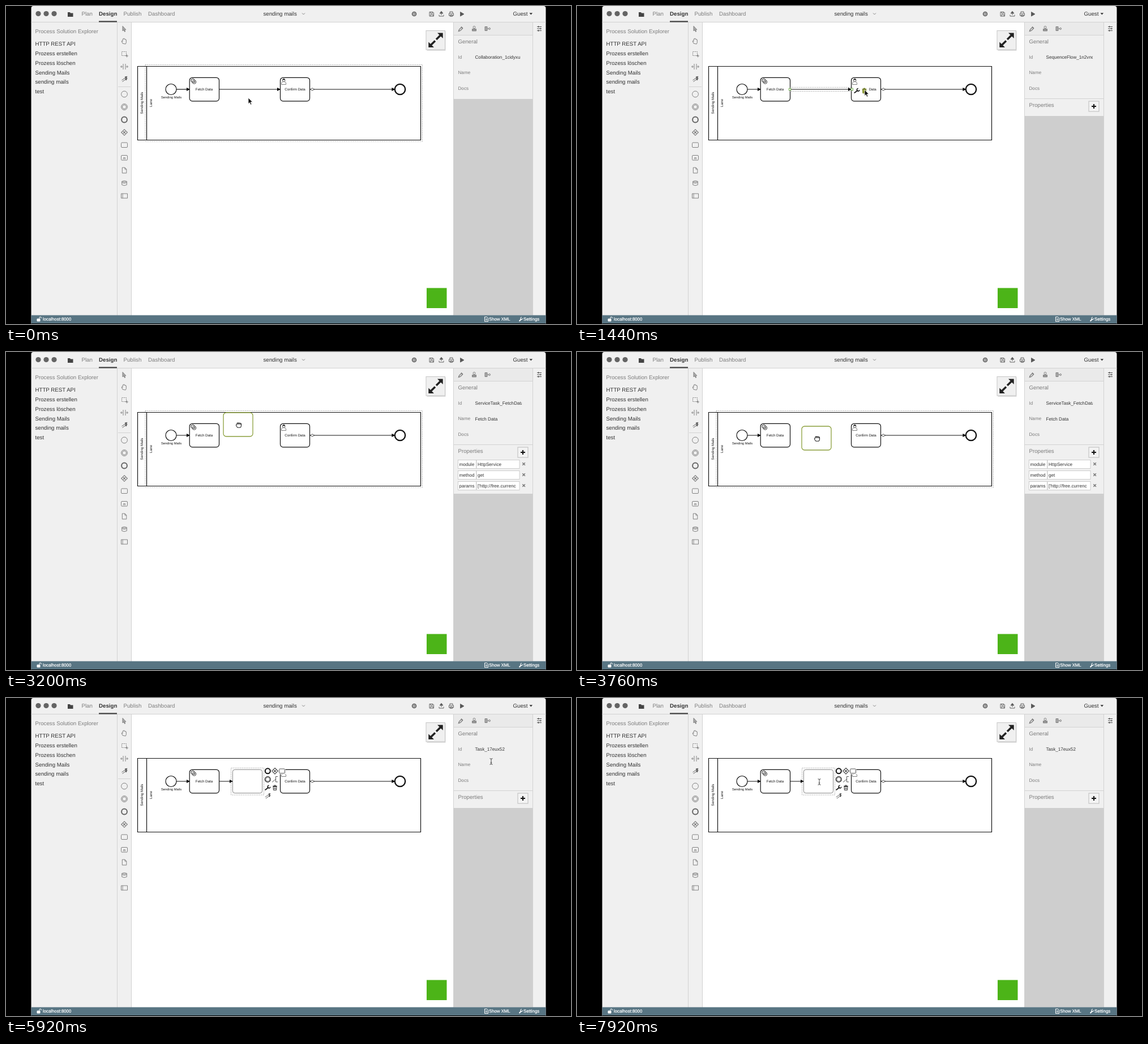
An HTML page that plays this animation: 998 px wide and 561 px high, repeating every 8 s.

```html
<!DOCTYPE html>
<html lang="en">
<head>
<meta charset="utf-8">
<title>Process designer</title>
<style>
html, body { margin: 0; width: 100%; height: 100%; overflow: hidden; background: #000; }
svg { display: block; width: 100%; height: 100%; }
text { font-family: "Liberation Sans", Arial, sans-serif; font-size: 9.7px; fill: #333; white-space: pre; text-rendering: geometricPrecision; }
.mute { fill: #7c7c7c; }
.small { font-size: 8.15px; }
.task { font-size: 6.2px; fill: #111; text-anchor: middle; }
.foot { font-size: 7.8px; fill: #fff; stroke: #fff; stroke-width: .2; }
.line { fill: none; stroke: #111; stroke-width: 1.2; }
.thin { fill: none; stroke: #777; stroke-width: .9; }
.dash { fill: none; stroke: #999; stroke-width: .8; stroke-dasharray: 1.8 1.4; }
.box { fill: #fff; stroke: #111; stroke-width: 1.2; }
.rule { fill: none; stroke: #d2d2d2; stroke-width: 1; }
.field { fill: #fff; stroke: #c4c4c4; stroke-width: .8; }
</style>
</head>
<body>
<svg viewBox="0 0 998 561" preserveAspectRatio="none">
  <defs>
    <clipPath id="win"><path d="M44.5 561V4q0-4 4-4H949.5q4 0 4 4V561z"/></clipPath>
    <clipPath id="idClip"><rect x="828" y="80" width="83" height="18"/></clipPath>
    <clipPath id="keyClip"><rect x="799" y="188" width="30.5" height="60"/></clipPath>
    <clipPath id="valClip"><rect x="831" y="188" width="75" height="60"/></clipPath>
    <marker id="tip" viewBox="0 0 6 6" refX="5.6" refY="3" markerWidth="6" markerHeight="6" markerUnits="userSpaceOnUse"><path d="M0 0L6 3L0 6z"/></marker>
    <g id="wrench"><path d="M-4.2 3.6L1.2-.5" stroke="#222" stroke-width="1.9" stroke-linecap="round"/><path d="M4.5-1.6A2.4 2.4 0 1 1 2.3-4" fill="none" stroke="#222" stroke-width="1.5"/></g>
    <path id="trash" d="M-3-1.8L-2.6 4.2H2.6L3-1.8zM-4-2.8H4M-1.4-3V-4.3H1.4V-3M-1-.3V2.8M1-.3V2.8"/>
    <g id="connect"><path d="M-4.5 2L3-3.3M-3.5 4.5L4-.8" fill="none" stroke="#555" stroke-width=".9"/><path d="M5-4.8L3.3-.9L1-4.1zM5.2-1.6L3.2 2.2L1.2-1z" fill="#444"/></g>
    <path id="gate" d="M0-5.3L5.3 0L0 5.3L-5.3 0zM-2-2L2 2M2-2L-2 2" fill="none" stroke-width="1.1"/>
  </defs>

  <g clip-path="url(#win)">
    <rect x="44" width="910" height="561" fill="#f0f0f0"/>
    <rect x="222" y="29" width="568" height="517" fill="#fff"/>
    <rect x="791" y="29" width="139" height="22" fill="#eaeaea"/>
    <rect id="void" x="791" y="164" width="139" height="382" fill="#cecece"/>
    <path class="rule" d="M44 28.5H954M196.5 29V546M221.5 29V546M790.5 29V546M930.5 29V546M791 51.5H930M198 142.5H220"/>
    <rect x="44" y="545.5" width="910" height="14.5" fill="#587583"/>
    <rect x="44" y="560" width="910" height="1"/>
    <rect x="164" y="26.3" width="32" height="2.2" fill="#444"/>
    <g fill="#646464"><circle cx="57" cy="13.5" r="4.6"/><circle cx="71" cy="13.5" r="4.6"/><circle cx="85" cy="13.5" r="4.6"/></g>
    <path d="M109 11h4l1 1.5h4.5V19H109z" fill="#444"/>
    <path d="M523 12.5l2.5 2.5l2.5-2.5" class="thin"/>
    <path d="M924.5 12.3h5.6l-2.8 3.2z" fill="#333"/>

    <!-- toolbar -->
    <g fill="none" stroke="#666" stroke-width="1">
      <circle cx="721" cy="14" r="3.4" stroke-width="1.8"/><path d="M718.5 14h5M721 11.5v5"/>
      <path d="M748 10.5h6l1.5 1.5v6h-7.5zM750 10.5v2.5h3.5v-2.5M750 18v-3h4v3"/>
      <path d="M765 15.5v2.5h8v-2.5M769 16v-4"/><path d="M766 13l3-3.7l3 3.7z" fill="#555"/>
      <path d="M784 13v-3h5v3M782.5 13h8v4h-8zM784.5 15.5h4v2.8h-4z"/>
      <path d="M802.5 10.5v7.5l6.5-3.7z" fill="#555"/>
    </g>

    <!-- palette -->
    <g class="thin" transform="translate(209 0)">
      <path d="M-3 35.5v8.500l2-1.800l1.500 3.200l1.200-.5l-1.400-3.100h2.600z" fill="#aaa"/>
      <path d="M-3 66l-2-4q.5-1.3 2 .6v-4q.8-1 1.5 0v-1q.8-1 1.6 0v1q.8-1 1.6 0v1q.9-.8 1.6 0v5l-1.2 2.5z"/>
      <path d="M-4.500 80.500h8v7h-8z" stroke-dasharray="2 1.300"/><path d="M2 88h5M4.500 85.500v5"/>
      <path d="M-2 102v10M2 102v10M-6 107h3M3 107h3M-4.500 105l-2 2l2 2M4.500 105l2 2l-2 2"/>
      <use href="#connect" y="129"/>
      <circle cy="155.500" r="5.400"/><circle cy="178" r="5.400"/><circle cy="178" r="3.600"/>
      <circle cy="200.500" r="4.900" stroke="#666" stroke-width="2"/>
      <use href="#gate" y="223" stroke="#777"/>
      <rect x="-5.500" y="241" width="11" height="8.500" rx="1.500"/>
      <rect x="-5.500" y="263.500" width="11" height="8.500" rx="1.500"/><path d="M-2.500 269.500h5M-2 267.500h4"/>
      <path d="M-3.700 285h4.700l2.800 2.800v7h-7.500zM1 285v3h2.800"/>
      <path d="M-4.300 309.500v6q4.300 2.500 8.600 0v-6M-4.300 309.500q4.300-2.500 8.600 0q-4.300 2.500-8.600 0M-4.300 311.500q4.300 2.500 8.600 0"/>
      <path d="M-5.500 331h11v8h-11zM-3 331v8"/>
    </g>

    <!-- side tabs -->
    <g class="thin">
      <path d="M799.500 44.500l1-3l4-4l2 2l-4 4zM804 36.500l3 3" stroke-width="1.3"/>
      <circle cx="827" cy="37.500" r="2"/><path d="M823.500 44v-3.500h7v3.500z" fill="#999"/>
      <path d="M846 36.500h4v7h-4z" fill="#aaa"/><path d="M850 40h3"/><circle cx="854" cy="40" r="1.500"/>
      <path d="M938 36.500h8M938 40h8M938 43.500h8M940.500 35v3M944 38.500v3M940.500 42v3" stroke="#444"/>
    </g>

    <!-- zoom button, badge, footer icons -->
    <rect x="743.500" y="45" width="33" height="34" fill="#ddd"/>
    <rect x="742" y="43.500" width="33.500" height="33.500" fill="#f0f0f0" stroke="#c5c5c5"/>
    <path d="M762 47.500h9.700V57zM746.300 63.500V73H756z" fill="#222"/>
    <path d="M768.500 50.700l-8.500 8.300M749.500 69.800l8.500-8.300" stroke="#222" stroke-width="3.500"/>
    <rect x="743" y="497.500" width="35.500" height="35.500" fill="#4cb418"/>
    <g fill="none" stroke="#fff" stroke-width="1">
      <path d="M55 552h5v4h-5z" fill="#fff"/><path d="M59 551.500v-1.500a1.600 1.600 0 0 1 3.200 0v1"/>
      <path d="M845.500 548.500h4l2 2v6h-6zM847 552h3M847 554h3"/>
      <path d="M906.500 556l4-4" stroke-width="1.800"/><path d="M912.800 550.800a2 2 0 1 1-1.800-1.800"/>
    </g>
    <g id="labels"></g>

    <!-- diagram -->
    <path class="line" d="M232.500 106.500H732.500V236.500H232.500zM248.500 106.500V236.500"/>
    <rect id="laneHover" class="dash" x="246" y="103.500" width="489.500" height="135.500"/>
    <text class="task" transform="translate(242.200 171) rotate(-90)">Sending Mails</text>
    <text class="task" transform="translate(257.700 171) rotate(-90)">Lane</text>
    <circle class="box" cx="291.500" cy="147" r="9.500"/>
    <text class="task" x="292" y="162.700" style="font-size:5.750px">Sending Mails</text>
    <path class="line" d="M301 147H324.500" marker-end="url(#tip)"/>
    <path id="flow" class="line" d="M377 147H484.500" marker-end="url(#tip)"/>
    <path class="line" d="M537 147H687" marker-end="url(#tip)"/>
    <path d="M537.500 147l3.500-2.200l3.500 2.200l-3.500 2.200z" fill="#fff" stroke="#222" stroke-width=".8"/>
    <circle class="box" cx="696" cy="147" r="9.200" style="stroke-width:2.300px"/>
    <rect class="box" x="324.200" y="126.300" width="52.300" height="41.500" rx="5"/>
    <g class="thin" style="stroke:#333"><circle cx="330" cy="131.500" r="2.900"/><circle cx="332.500" cy="134" r="3.300" fill="#fff"/><circle cx="332.500" cy="134" r="1.300"/><circle cx="330" cy="131.500" r="3.600" stroke-dasharray="1 1.200"/></g>
    <text class="task" x="350" y="149.200">Fetch Data</text>
    <rect class="box" x="484.500" y="126.300" width="52" height="41.500" rx="5"/>
    <path class="thin" d="M486.500 138.500v-2.500q0-2 3-2.500h2q3 .5 3 2.500v2.500z"/>
    <circle cx="490.700" cy="131.200" r="2.300" fill="#fff" stroke="#333" stroke-width=".7"/><path d="M488.300 131q0-3 2.400-3t2.400 3q-2.400-1.700-4.800 0z" fill="#222"/>
    <text class="task" x="510.500" y="149.200">Confirm Data</text>

    <rect id="flowHover" class="dash" x="376" y="143.500" width="110.500" height="7"/>
    <g id="flowPad">
      <g fill="#fff" stroke="#6cae45" stroke-width=".9"><rect x="374.300" y="145.300" width="3.500" height="3.500"/><rect x="484" y="145.300" width="3.500" height="3.500"/></g>
      <rect x="488.500" y="142.500" width="26.500" height="13" fill="#fff"/>
      <use href="#wrench" x="494.500" y="149.500"/><use id="flowTrash" href="#trash" x="507.500" y="149.500"/>
    </g>
    <rect id="fetchHover" class="dash" x="321.500" y="123.500" width="58" height="47.500"/>
    <rect id="confirmHover" class="dash" x="481.500" y="123.500" width="58" height="47.500"/>

    <g id="newTask">
      <path class="line" d="M377 147H400.500" marker-end="url(#tip)"/>
      <rect x="400.300" y="126.300" width="52.300" height="41.500" rx="4" fill="#fff" stroke="#777" stroke-width=".9"/>
      <rect class="dash" x="397.500" y="123.500" width="58" height="47.500"/>
    </g>
    <g id="pad">
      <rect x="482" y="123.500" width="11.500" height="10.800" fill="#fff"/>
      <circle class="line" cx="462.300" cy="128.800" r="4.500" style="stroke-width:2px"/>
      <use href="#gate" x="475" y="128.800" stroke="#444"/>
      <rect class="thin" x="482.500" y="125" width="10" height="7.800" rx="1.500" style="stroke:#444"/>
      <circle class="line" cx="462.300" cy="143.500" r="4.800"/><circle class="thin" cx="462.300" cy="143.500" r="3.300"/>
      <path class="thin" d="M480 138.500h-3.500v9.500h3.500M470 148.500l6-5" style="stroke:#444"/>
      <use href="#wrench" x="462.300" y="158.300"/><use id="padTrash" href="#trash" x="475" y="158.300"/>
      <use href="#connect" x="462.300" y="172.800"/>
    </g>
    <rect id="ghost" x="-26" y="-21" width="52" height="42" rx="5" fill="#fff" fill-opacity=".8" stroke="#8b9f3c" stroke-width="1.300"/>

    <!-- properties -->
    <text id="idText" class="small" x="828.500" y="93" clip-path="url(#idClip)"></text>
    <text id="nameText" class="small" x="828.500" y="120.500">Fetch Data</text>
    <g id="props">
      <path class="rule" d="M791 163.500H930"/>
      <text class="mute" x="798.500" y="178.300">Properties</text>
      <rect x="904" y="168" width="18" height="18" fill="#f4f4f4" stroke="#bbb"/>
      <path d="M909 177h8M913 173v8" stroke="#111" stroke-width="2"/>
    </g>
    <g id="rows"></g>
  </g>

  <path id="arrow" d="M0 0V10.500L2.400 8.300L4.100 12.200L5.900 11.400L4.200 7.600H7.500z" fill="#111" stroke="#fff" stroke-width=".7"/>
  <path id="beam" d="M-2.500-5.200Q0-5.200 0-4Q0-5.200 2.500-5.200M0-4V4M-2.500 5.200Q0 5.200 0 4Q0 5.200 2.500 5.200M-1.300 2H1.300" fill="none" stroke="#333" stroke-width=".9"/>
  <path id="fist" d="M-4.500 0q0-1.500 1.500-1.200v-2q1-1.300 2 0q1-1.300 2 0q1-1.100 2 .2q1.500-.4 1.500 1.200v2.500q0 2-1.500 3.500h-5q-2.500-2-2.500-4.200zM-1-3v2M1-3v2M3-2.500v1.700" fill="#fff" stroke="#222" stroke-width="1.100"/>
</svg>

<script>
const $ = id => document.getElementById(id);
const LOOP = 8000, STEP = 80;

const text = (x, y, s, cls = "", extra = "") => `<text x="${x}" y="${y}" class="${cls}" ${extra}>${s}</text>`;
const files = ["HTTP REST API", "Prozess erstellen", "Prozess löschen", "Sending Mails", "sending mails", "test"];

$("labels").innerHTML = [
  text(133.5, 17.4, "Plan", "mute"),
  text(164, 17.4, "Design", "", 'font-weight="bold"'),
  text(207.5, 17.4, "Publish", "mute"),
  text(251, 17.4, "Dashboard", "mute"),
  text(454.5, 17, "sending mails"),
  text(895.5, 17.4, "Guest"),
  text(51.5, 48, "Process Solution Explorer", "mute"),
  ...files.map((s, i) => text(51.5, 70.1 + i * 16.8, s)),
  text(798.5, 66.2, "General", "mute"),
  ...["Id", "Name", "Docs"].map((s, i) => text(798.5, 93 + i * 27.4, s, "mute small")),
  text(65, 555.4, "localhost:8000", "foot"),
  text(853, 555.4, "Show XML", "foot"),
  text(914, 555.4, "Settings", "foot")
].join("");

const params = [["module", "HttpService"], ["method", "get"], ["params", "['http://free.currenc"]];
$("rows").innerHTML = params.map(([k, v], i) => {
  const y = 190.5 + i * 19;
  return `<rect class="field" x="798.5" y="${y}" width="32" height="15"/>
    <rect class="field" x="831" y="${y}" width="76" height="15"/>` +
    text(800.5, y + 10.4, k, "small", 'clip-path="url(#keyClip)"') +
    text(833, y + 10.4, v, "small", 'clip-path="url(#valClip)"') +
    `<path d="M912.3 ${y + 4.7}l4.6 4.6m0-4.6l-4.6 4.6" stroke="#777" stroke-width="1.5"/>`;
}).join("");

// time, x, y of the pointer
const path = [
  [0, 428, 162], [160, 428, 162], [560, 429, 147], [880, 429, 147], [1360, 508, 148],
  [1760, 508, 148], [2400, 368, 146], [2720, 368, 146], [3120, 411, 129], [3280, 411, 129],
  [3760, 424, 153], [4000, 427, 148], [4160, 427, 148], [4640, 528, 176], [4800, 528, 176],
  [5680, 857, 112], [6480, 857, 112], [7520, 428, 148], [8000, 428, 148]
];

// moments of the clicks
const PICK_FLOW = 720, CUT = 1680, PICK_TASK = 2640, DRAG = 3200, DROP = 4160;

const ease = k => k * k * (3 - 2 * k);
function pointer(t) {
  const i = path.findIndex(p => p[0] > t);
  const [a, b] = [path[i - 1], path[i]];
  const k = ease((t - a[0]) / (b[0] - a[0]));
  return [a[1] + (b[1] - a[1]) * k, a[2] + (b[2] - a[2]) * k];
}

const show = (id, on) => $(id).setAttribute("display", on ? "inline" : "none");
const move = (id, x, y) => $(id).setAttribute("transform", `translate(${x.toFixed(2)} ${y.toFixed(2)})`);
function glow(id, on) {
  $(id).setAttribute("stroke", on ? "#5f6b14" : "#333");
  $(id).setAttribute("fill", on ? "#c3d25a" : "none");
}

function draw(t) {
  const [x, y] = pointer(t);
  const dropped = t >= DROP, dragging = t >= DRAG && !dropped;
  const taskPicked = t >= PICK_TASK && !dropped;
  const overFlow = t < PICK_FLOW && y < 151;
  const overFetch = t > CUT && t < PICK_TASK && x < 377;
  const overConfirm = t >= CUT && t < PICK_TASK && x > 484;
  const flowPicked = t >= PICK_FLOW && t < CUT;

  show("flow", t < CUT);
  show("flowHover", overFlow || flowPicked);
  show("flowPad", flowPicked);
  glow("flowTrash", x > 500);
  show("fetchHover", overFetch || (taskPicked && !dragging));
  show("confirmHover", overConfirm);
  show("laneHover", (t < PICK_FLOW && !overFlow) || dragging ||
    (t >= CUT && t < PICK_TASK && !overFetch && !overConfirm));
  show("newTask", dropped);
  show("pad", dropped || (taskPicked && !dragging));
  move("pad", dropped ? 0 : -76, 0);
  glow("padTrash", t >= 4320 && t < 4800);
  show("ghost", dragging);
  move("ghost", x - 1, y - 1);

  $("idText").textContent = dropped ? "Task_17eux52" : taskPicked ? "ServiceTask_FetchData"
    : t >= PICK_FLOW ? "SequenceFlow_1n2vnq" : "Collaboration_1cidyxu";
  show("nameText", taskPicked);
  show("rows", taskPicked);
  show("props", t >= PICK_FLOW);
  const top = taskPicked ? 250 : t >= PICK_FLOW ? 194 : 164;
  $("void").setAttribute("y", top);
  $("void").setAttribute("height", 545.5 - top);

  const typing = dropped && (x > 826 || (t > 6480 && x < 453));
  show("beam", typing);
  show("fist", dragging);
  show("arrow", !typing && !dragging);
  for (const id of ["beam", "fist", "arrow"]) move(id, x, y);
}

const start = performance.now();
function tick() {
  const t = (performance.now() - start) % LOOP;
  draw(Math.floor(t / STEP) * STEP);
  requestAnimationFrame(tick);
}
tick();
</script>
</body>
</html>
```
